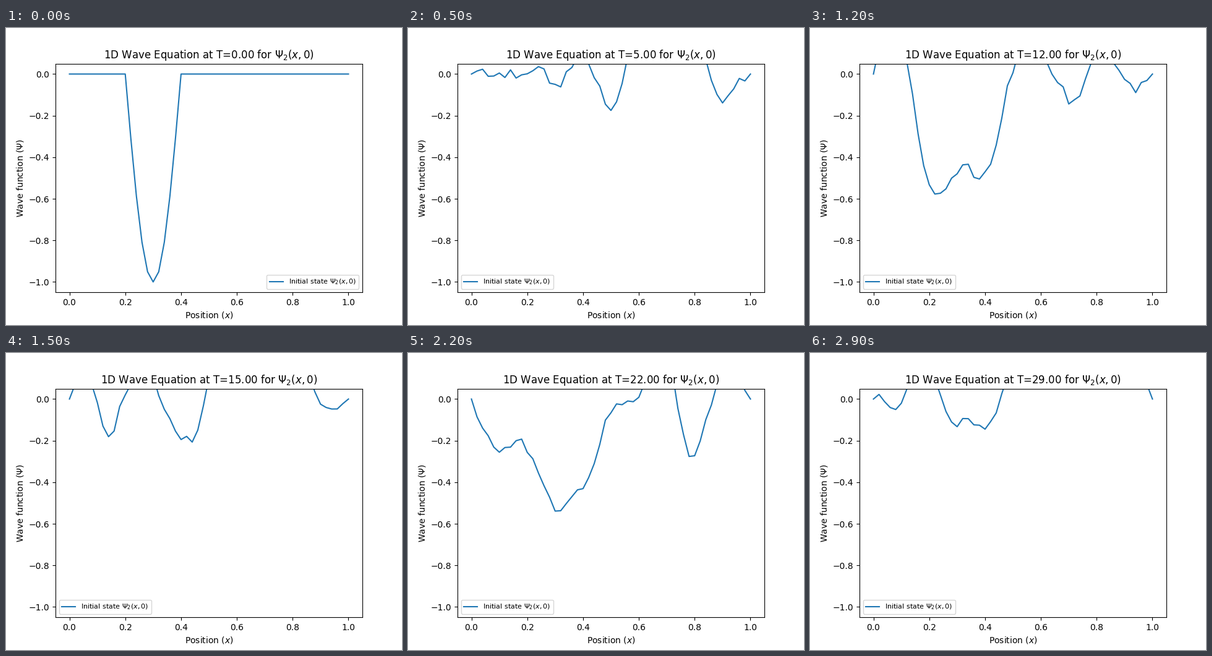
Animation, 640 px wide and 480 px high, one loop 3000 ms. Source, as a matplotlib script:

```python
import numpy as np
import matplotlib.pyplot as plt
from matplotlib.animation import FuncAnimation

FRAMES = 30
INTERVAL = 100
CELLS = 50
DT = 0.001
STEPS_PER_FRAME = 1000

x = np.linspace(0, 1, CELLS + 1)


def initial_state():
    """A single negative half sine between 0.2 and 0.4."""
    inside = (x > 0.19) & (x < 0.41)
    return np.where(inside, np.sin(5 * np.pi * x), 0.0)


def simulate():
    """Leapfrog solution with fixed ends, one snapshot per time unit."""
    r2 = (DT * CELLS) ** 2

    def curvature(u):
        return r2 * (u[2:] - 2 * u[1:-1] + u[:-2])

    now = initial_state()
    now[[0, -1]] = 0
    snapshots = [now.copy()]
    # starts at rest, so the first step is half an acceleration
    prev = now.copy()
    prev[1:-1] += 0.5 * curvature(now)
    for step in range(1, (FRAMES - 1) * STEPS_PER_FRAME + 1):
        new = np.zeros_like(now)
        new[1:-1] = 2 * now[1:-1] - prev[1:-1] + curvature(now)
        prev, now = now, new
        if step % STEPS_PER_FRAME == 0:
            snapshots.append(now.copy())
    return snapshots


states = simulate()

fig, ax = plt.subplots(figsize=(6.4, 4.8), dpi=100)
line, = ax.plot(x, states[0], label=r"Initial state $\Psi_2(x,0)$")
ax.set_xlim(-0.05, 1.05)
ax.set_ylim(-1.05, 0.05)
ax.set_xlabel("Position ($x$)")
ax.set_ylabel(r"Wave function ($\Psi$)")
ax.legend(loc="best", fontsize=8)
title = ax.set_title("")


def update(i):
    line.set_ydata(states[i])
    title.set_text(rf"1D Wave Equation at T={i:.2f} for $\Psi_2(x,0)$")
    return line, title


anim = FuncAnimation(fig, update, frames=FRAMES, interval=INTERVAL,
                     init_func=lambda: update(0), repeat=True,
                     repeat_delay=0, blit=False)
plt.show()
```
